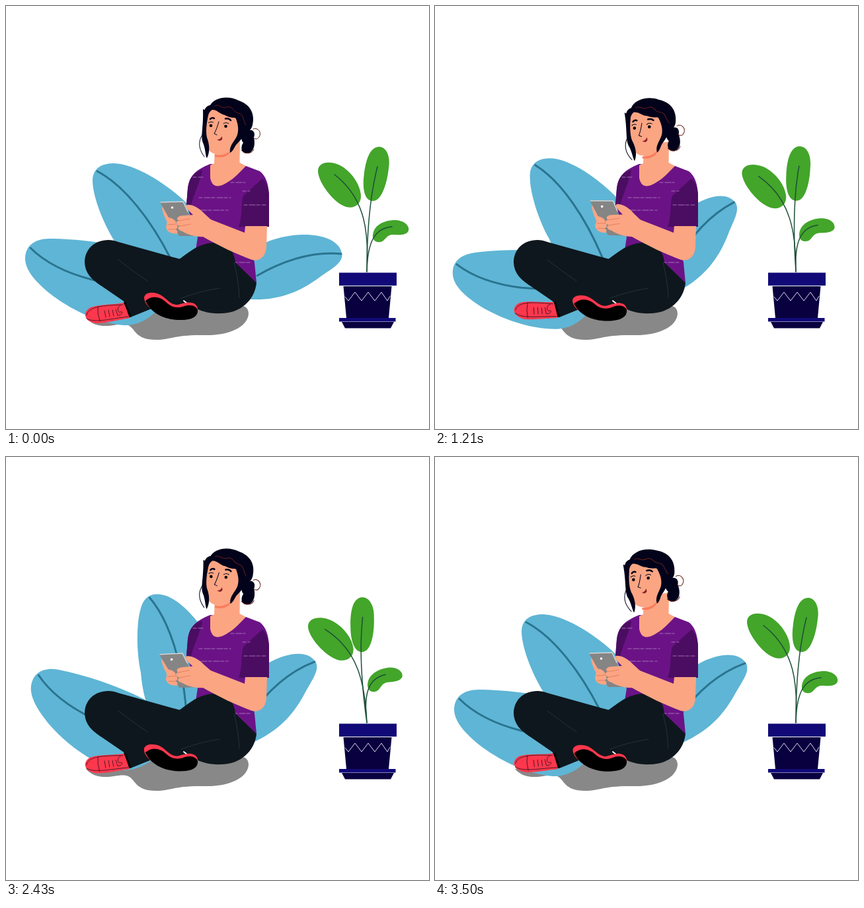
Write an HTML page that moves like this. It is 640x640 px and loops after 3570 ms.

```html
<!DOCTYPE html>
<html lang="en">
<head>
<meta charset="utf-8">
<title>Woman with phone</title>
<style>
html, body { margin: 0; width: 100%; height: 100%; overflow: hidden; background: #fff; }
svg { display: block; width: 100vw; height: 100vh; }
.line { fill: none; stroke-linecap: round; stroke-linejoin: round; }
.blue { fill: #5fb5d5; }
.vein { stroke: #2a7490; stroke-width: 3; }
.green { fill: #43a52a; }
.stem { stroke: #1d4f38; stroke-width: 1.5; }
.skin { fill: #fba583; }
.hair { fill: #02021a; }
.ink { stroke: #02021a; }
.wisp { stroke: #642018; }
.dark { fill: #0e171d; }
.crease { stroke: #22323d; }
.red { fill: #ff374d; }
.rim { fill: #110977; }
.pot { fill: #09003f; }
.knuckle { stroke: #e67f60; }
</style>
</head>
<body>
<svg viewBox="0 0 640 640">
  <path fill="#888" d="M121 472C130 482 140 484 150 484C165 484 175 479 185 483C196 488 195 505 227 505C250 505 255 497 300 498C335 499 365 487 367 466C367 455 360 452 345 452L190 455Z"/>

  <g id="mid">
    <path class="blue" d="M131 264C131 247 143 238 163 238C198 239 246 272 272 297C295 325 305 395 275 440C250 450 200 428 167 360C150 335 131 290 131 264Z"/>
    <path class="line vein" d="M138 250C180 272 220 325 249 382L256 402"/>
  </g>
  <g id="low">
    <path class="blue" d="M29 382C29 364 42 352 66 352C105 352 155 358 200 370C235 385 245 430 231 458C215 476 195 484 178 483C140 480 95 458 65 434C42 415 29 398 29 382Z"/>
    <path class="line vein" d="M37 366C62 391 95 405 130 414L180 424"/>
  </g>
  <g id="right">
    <path class="blue" d="M508.500 377C507 354 476 345 448 346C415 347 380 358 350 385L330 420C335 440 358 445 385 444C425 442 452 427 475 410C492 398 508 390 508.500 377Z"/>
    <path class="line vein" d="M507 375C462 371 420 385 380 408"/>
  </g>

  <g id="leafL">
    <path class="green" d="M472 249C473 236 488 234 503 240C520 247 537 270 537 288C537 300 527 307 515 304C498 300 472 268 472 249Z"/>
    <path class="line stem" d="M546 402C549 345 545 292 497 255"/>
  </g>
  <g id="leafR">
    <path class="green" d="M564 213C576 213 582 228 579 245C577 266 569 294 556 295C542 296 540 276 541 262C543 240 548 214 564 213Z"/>
    <path class="green" d="M555 350C554 332 572 324 588 324C602 324 611 332 609 340C606 348 592 346 585 346C575 346 573 357 566 357C560 358 556 355 555 350Z"/>
    <path class="line stem" d="M546 402C546 350 550 290 562 243M546 396C548 360 556 336 584 334"/>
  </g>
  <path class="rim" d="M504 403.500H591V423H504ZM504 472H589.500V477.500H504Z"/>
  <path class="pot" d="M510.500 424H583.500L579 472H515ZM508 478H587L582 487.500H513Z"/>
  <path class="line" stroke="#dcdcf2" d="M513 440l5 6 10-13 10 13 10-13 10 13 10-13 9 13 4-7"/>

  <path fill="#6b1386" d="M309 239C290 247 278 254 275 276L273 300L290 350L286 375L379 419L376 388L362 333H398V285C397 270 394 258 384 250L363 242Z"/>
  <path fill="#4b0d62" d="M296 248C283 253 277 260 275 276L273 302L280 302C283 288 292 270 297 250ZM388 261L359 287C355 300 358 318 352 334H398V285C397 275 394 266 388 261Z"/>
  <path class="line" stroke="#b287c0" stroke-dasharray="5 3 9 2" stroke-width=".8" d="M283 259H298M340 267H362M292 290H340M358 280H369M360 301H393M287 309H336M345 388H372"/>
  <path class="skin" d="M316 212L315 238L309 241V260C312 276 323 274 333 268C346 261 354 251 363 242L353.500 237L354 205Z"/>

  <g id="head">
    <path class="hair" d="M362 190C370 184 379 189 375 199C378 211 374 224 363 223C355 222 355 212 359 207C354 201 356 193 362 190Z"/>
    <path class="line wisp" d="M374 186C382 183 387 192 383 198C380 203 376 201 374 199M356 218C362 225 372 224 375 217"/>
    <path class="skin" d="M303 160C302 180 300 200 304 212C307 223 318 226 330 224C345 220 354 206 357 190L358 160C340 150 320 145 303 160Z"/>
    <path fill="#f97d5c" d="M316 225C326 227 334 224 341 218C338 227 328 231 316 228Z"/>
    <g id="lockL">
      <path class="hair" d="M298 156L307 160C303 178 302 190 304 199C308 209 309 221 304 230C302 229 302 216 298 207C294 197 299 184 298 156Z"/>
      <path class="line ink" d="M299 192C289 205 292 217 300 228"/>
    </g>
    <path id="lockR" class="hair" d="M347 168L364 174C365 190 358 200 351 207C345 212 345 219 339 222C337 211 347 204 350 195C353 185 350 176 347 168Z"/>
    <path class="hair" d="M302 178C298 165 298 152 309 150C316 138 336 135 352 143C369 149 377 162 373 180C371 188 366 191 358 193C359 183 354 173 346 169C339 169 335 167 331 165C324 164 320 157 312 157C307 160 305 166 304 174Z"/>
    <path class="line wisp" d="M316 151C323 147 325 156 334 153C343 150 343 160 351 162C361 164 358 174 363 180"/>
    <path class="line ink" stroke-width="2.500" d="M309 171Q312 168 315 170M332 170.500Q337 169.500 340 173"/>
    <g id="open">
      <circle cx="310" cy="181" r="2.300"/><circle cx="332.500" cy="182" r="2.300"/>
      <path class="line ink" d="M306.500 176.500Q310 174 313.500 176M329 178Q333 175 337 178"/>
    </g>
    <path id="shut" class="line ink" d="M307 175.500Q311 172 315 174.500M331 178Q336 175 340 178.500"/>
    <path class="line ink" d="M322 175C320 182 318 188 315 193L319 195"/>
    <path fill="#8b1e2c" d="M319 202Q325 202 326.500 197Q329 203 323 204Z"/>
  </g>

  <path class="dark" d="M155 354C134 354 119 368 119 388C120 405 130 414 145 424L180 448L225 440L285 388L260 382L170 357C165 355 160 354 155 354Z"/>
  <path class="dark" d="M318 358C338 359 346 374 347 388L379 419C376 446 354 464 328 465C308 466 295 462 285 456L230 454L188 471L178 447C210 425 250 390 285 367C296 361 306 358 318 358Z"/>
  <path class="line crease" d="M170 384Q190 400 214 416M345 388Q352 415 353 441M265 442Q295 431 323 427"/>
  <path class="line" stroke="#fff" stroke-width="2" d="M269 446L274 450"/>

  <g id="shoeL">
    <path d="M176 450L181 448L190 470L182 473Z"/>
    <path class="red" d="M128 456C142 451 163 452 178 449C182 457 184 464 187 472C170 475 155 479 139 480C127 480 119 473 120 466C121 461 124 458 128 456Z"/>
    <path class="line" stroke="#24131c" stroke-width=".8" d="M122 468C124 456 140 453 177 452M122 473C135 480 158 473 185 470M139 455Q138 466 142 477M149 461l2 10M155 460l2 10M161 460l2 9M166 459l3 9C176 468 178 461 173 463C169 465 167 455 173 453"/>
  </g>
  <g id="shoeR">
    <path class="red" d="M209 441C210 434 219 432 229 435C242 439 247 453 260 452C269 450 277 446 286 451C291 455 291 461 289 464L220 459C214 454 209 448 209 441Z"/>
    <path d="M211 446C221 437 234 440 242 448C252 458 262 457 270 454C280 451 288 454 290 460C291 470 281 475 267 475C244 476 220 467 211 446Z"/>
  </g>

  <path class="skin" d="M302 320L361 343L362 333H395L394 365C393 379 384 387 372 384C350 376 322 363 296 348Z"/>
  <g id="hands">
    <path class="skin" d="M236 304C242 306 246 315 250 318L266 342C258 347 245 344 243 337C240 332 245 331 244 327C240 320 236 310 236 304Z"/>
    <path fill="#858585" d="M233 297L268 296L292 348L262 348Z"/>
    <path class="line" stroke="#d4d4d4" stroke-width="1.500" d="M234 297L268 296L275 311"/>
    <circle cx="251.500" cy="305" r="1.800" fill="#fff"/>
    <path class="skin" d="M244 320C252 320 258 325 257 329C261 333 260 337 256 338C262 340 260 345 253 344C245 342 242 338 243 334Z"/>
    <path class="skin" d="M273 301C281 299 293 306 300 314L312 325L300 349C288 350 275 346 267 341C260 339 258 335 263 333C256 331 256 326 261 325C256 320 262 317 269 317L283 316C276 309 271 305 273 301Z"/>
    <path class="line knuckle" d="M261 325l17-3M263 333l16-3M245 331l12-1M246 338h10"/>
  </g>
</svg>
<script>
const LOOP = 3570;
const el = id => document.getElementById(id);

// Swings from rest through [time, angle] turning points, easing in and out.
const swing = (...turns) => t => {
  let [t0, a0] = [0, 0];
  for (const [t1, a1] of turns) {
    if (t < t1) return a0 + (a1 - a0) * (1 - Math.cos(Math.PI * (t - t0) / (t1 - t0))) / 2;
    [t0, a0] = [t1, a1];
  }
  return a0;
};

const sway = swing([860, -10.5], [1740, 8.3], [2600, -9.7], [3500, 0]);
const step = swing([900, 7], [1700, 7], [2750, .3], [3500, 3.5]);
const lock = t => 1 - Math.cos(6 * Math.PI * t / LOOP);

// Each part turns about its own pivot: id, x, y, angle(t).
const parts = [
  ["low", 225, 410, swing([500, 11.5], [1350, -8.8], [2550, 11.8], [3500, 0])],
  ["mid", 275, 440, swing([530, -10.4], [2110, 26.4], [3250, 0])],
  ["right", 345, 430, swing([720, -32.3], [1300, -32.3], [2800, -24.8])],
  ["leafL", 546, 402, t => .72 * sway(t)],
  ["leafR", 546, 402, sway],
  ["head", 335, 245, swing([1300, -7.6], [2200, .3], [2500, .3], [3520, -9])],
  ["lockL", 303, 163, t => 9.2 * lock(t)],
  ["lockR", 356, 170, t => -8 * lock(t)],
  ["hands", 302, 340, swing([430, -3], [1850, 5.5], [2700, -3.6], [3500, 0])],
  ["shoeL", 188, 461, step],
  ["shoeR", 286, 460, t => -.5 * step(t)]
];

function draw(t) {
  for (const [id, x, y, angle] of parts)
    el(id).setAttribute("transform", `rotate(${angle(t).toFixed(3)} ${x} ${y})`);
  const blink = t > 1990 && t < 2180;
  el("open").style.display = blink ? "none" : "";
  el("shut").style.display = blink ? "" : "none";
}

const start = performance.now();
function tick() {
  draw((performance.now() - start) % LOOP);
  requestAnimationFrame(tick);
}
tick();
</script>
</body>
</html>
```
